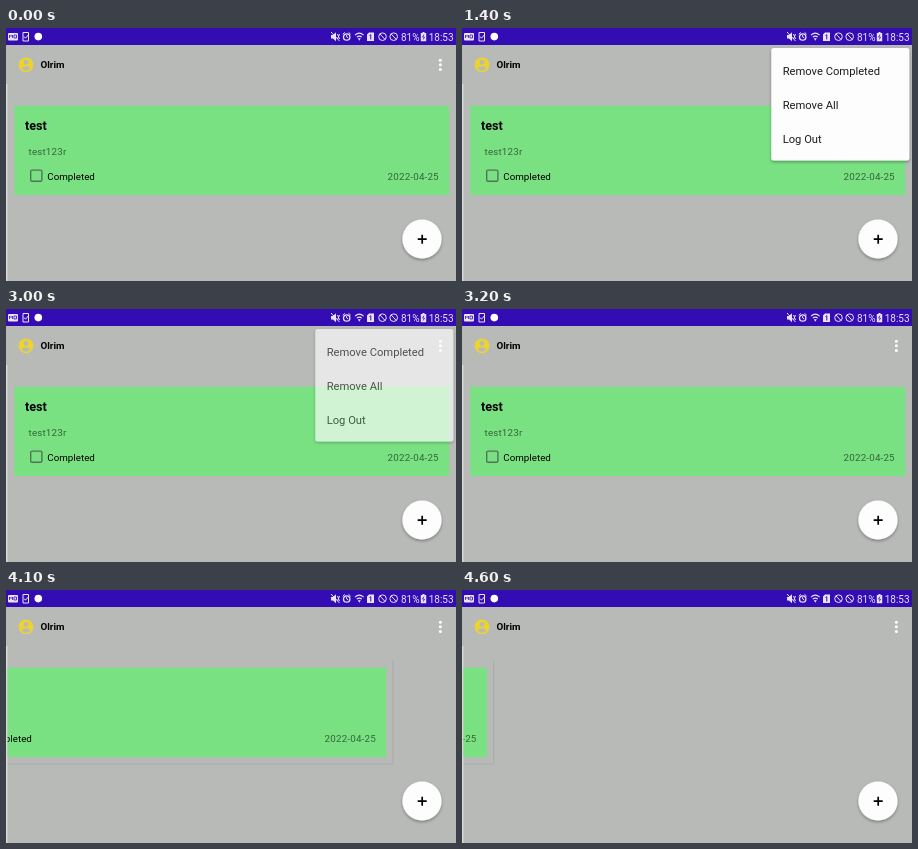
An HTML page that plays this animation: 450x253 px, repeating every 4.7 s.

```html
<!DOCTYPE html>
<html lang="en">
<head>
<meta charset="utf-8">
<title>Task list</title>
<style>
  html, body { margin: 0; width: 100%; height: 100%; overflow: hidden; background: #b8bab8; }
  svg { display: block; width: 100vw; height: 100vh; font-family: Roboto, sans-serif; }
  .body { font-size: 9.8px; }
  .spaced { letter-spacing: .0178em; fill: #35663a; }
  .bold { font-weight: 700; }
  .menu-text { font-size: 11.2px; fill: #1c1c1c; }
  .status { font-size: 10px; fill: #e9e4f8; }
  .line { fill: none; stroke: #e9e4f8; }
  .solid { fill: #e9e4f8; }
</style>
</head>
<body>
<svg viewBox="0 0 450 253">
  <defs>
    <clipPath id="listClip"><rect x="1.5" y="56" width="449" height="197"/></clipPath>
    <clipPath id="menuClip"><rect class="menu-box" y="20" rx="2.5"/></clipPath>
    <filter id="shadow" x="-30%" y="-30%" width="160%" height="160%">
      <feDropShadow dx="0" dy="1.5" stdDeviation="1.8" flood-opacity=".35"/>
    </filter>
  </defs>

  <rect width="450" height="253" fill="#b8bab8"/>
  <rect y="56" width="1.5" height="197" fill="#d7d9d7"/>

  <!-- Status bar -->
  <rect width="450" height="17" fill="#340cb4"/>
  <rect class="solid" x="2" y="5" width="10" height="7.5" rx="1"/>
  <path d="M3.5 10V7l1.5 1.5L6.5 7v3M8 7h2.5v3H8z" fill="none" stroke="#340cb4" stroke-width=".8"/>
  <path class="line" d="M17 4.5h5.5v8.5H17zM18 8.5l1.5 1.7 3-3.5" stroke-width="1"/>
  <circle cx="32.3" cy="8.6" r="3.8" fill="#fff"/>
  <path class="solid" d="M325 7h2l3-2.7v9L327 10.5h-2z"/>
  <path class="line" d="M325 4l8.5 9M331.5 6l2 5M333.5 6l-2 5" stroke-width="1"/>
  <circle class="line" cx="340.7" cy="9" r="3.2" stroke-width="1.3"/>
  <path class="line" d="M340.7 7v2l1.5 1M336.8 6.2l2-1.8M344.6 6.2l-2-1.8" stroke-width="1"/>
  <path class="line" d="M349 7.2q4.3-4 8.6 0M350.8 9.2q2.5-2.2 5 0" stroke-width="1.1"/>
  <path class="solid" d="M351.8 10.2h3l-1.5 2.6zM363 4.5h5v8.5h-7V6.5z"/>
  <path d="M363.5 7.5l1.3-.8v4.8" fill="none" stroke="#340cb4"/>
  <g class="line">
    <circle cx="376.5" cy="8.7" r="3.8"/><path d="M374 6l5 5.4"/>
    <circle cx="387.7" cy="8.7" r="3.8"/><path d="M385.2 6l5 5.4"/>
  </g>
  <text class="status" x="395" y="12.5">81%</text>
  <path class="solid" d="M416.5 4h2v1h1.7v8.3h-5.4V5h1.7z"/>
  <path d="M418 6.5l-1.5 2.6h2l-1.3 2.4" fill="none" stroke="#340cb4" stroke-width=".8"/>
  <text class="status" x="422.7" y="12.5">18:53</text>

  <!-- App bar -->
  <circle cx="20" cy="36.8" r="7.4" fill="#edd32f"/>
  <circle cx="20" cy="34.4" r="2.3" fill="#b8bab8"/>
  <path d="M15.5 40.3q4.5-4 9 0-4.5 5-9 0z" fill="#b8bab8"/>
  <text class="body bold" x="34.5" y="40.4">Olrim</text>
  <g fill="#fff">
    <circle cx="434.4" cy="32.2" r="1.5"/>
    <circle cx="434.4" cy="36.8" r="1.5"/>
    <circle cx="434.4" cy="41.4" r="1.5"/>
  </g>

  <!-- Task card -->
  <g clip-path="url(#listClip)">
    <g id="card">
      <path id="cardEdge" d="M0 174h450V70" fill="none" stroke="#a9aba9" stroke-width="1"/>
      <rect x="8.3" y="77.7" width="435" height="89.3" fill="#7ae183"/>
      <text class="bold" x="19" y="101.8" font-size="12.6">test</text>
      <text class="body spaced" x="22.5" y="126.6">test123r</text>
      <rect x="24.7" y="142.1" width="11.2" height="11.2" rx="1.2" fill="none" stroke="#517457" stroke-width="1.4"/>
      <text class="body" x="41.3" y="151.6">Completed</text>
      <text class="body spaced" x="381.6" y="151.6">2022-04-25</text>
    </g>
  </g>

  <!-- Add button -->
  <circle cx="416" cy="211" r="19.6" fill="#fdfdfd" filter="url(#shadow)"/>
  <path d="M411.7 211.2h9M416.2 206.7v9" stroke="#000" stroke-width="1.7"/>

  <!-- Overflow menu -->
  <g id="menu">
    <rect class="menu-box" y="20" rx="2.5" fill="#fdfdfd" filter="url(#shadow)"/>
    <g class="menu-text" clip-path="url(#menuClip)">
      <text x="320.7" y="46.9">Remove Completed</text>
      <text x="320.7" y="80.7">Remove All</text>
      <text x="320.7" y="114.5">Log Out</text>
    </g>
  </g>
</svg>
<script>
  const LOOP = 4700, STEP = 100;
  const MENU = { right: 447.3, width: 138, height: 112.5 };
  const menu = document.getElementById('menu');
  const menuBoxes = document.querySelectorAll('.menu-box');
  const card = document.getElementById('card');
  const cardEdge = document.getElementById('cardEdge');

  const progress = (t, start, end) => Math.min(1, Math.max(0, (t - start) / (end - start)));
  const easeOut = p => 1 - (1 - p) ** 2;
  const easeInOut = p => (1 - Math.cos(Math.PI * p)) / 2;

  function cardOffset(t) {
    if (t < 3800) return 0;
    const drag = progress(t, 3800, 4300);
    const swipe = easeInOut(progress(t, 4300, 4640));
    return -11 - 101 * drag ** 1.3 - 317 * swipe;
  }

  function drawMenu(t) {
    const open = easeOut(progress(t, 950, 1350));
    const visible = t >= 1000 && t < 3200;
    const fadeIn = progress(t, 900, 1150);
    const fadeOut = 1 - easeInOut(progress(t, 2870, 3200));
    menu.style.display = visible ? '' : 'none';
    menu.style.opacity = fadeIn * fadeOut;
    for (const box of menuBoxes) {
      box.setAttribute('x', MENU.right - MENU.width * open);
      box.setAttribute('width', MENU.width * open);
      box.setAttribute('height', MENU.height * open);
    }
  }

  function draw(now) {
    const t = Math.floor((now % LOOP) / STEP) * STEP;
    const offset = cardOffset(t);
    card.setAttribute('transform', `translate(${offset})`);
    cardEdge.style.display = offset ? '' : 'none';
    drawMenu(t);
  }

  let start;
  function tick(now) {
    start ??= now;
    draw(now - start);
    requestAnimationFrame(tick);
  }
  draw(0);
  requestAnimationFrame(tick);
</script>
</body>
</html>
```
